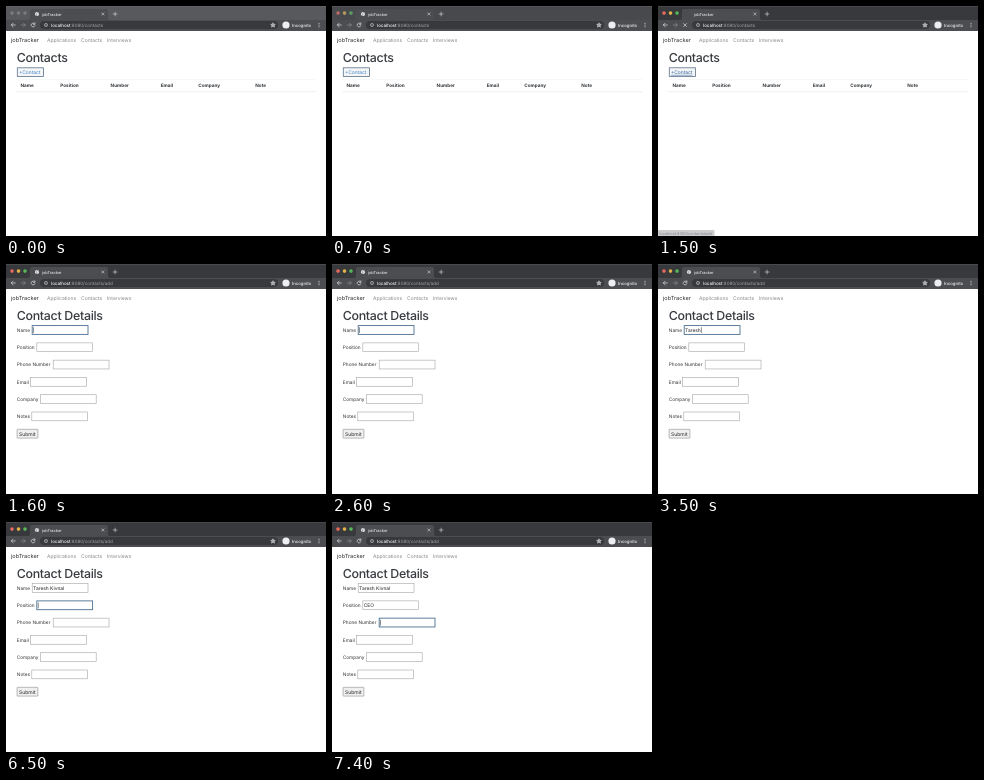
Recreate the animation shown at these times as an HTML page. Size 320 by 230 pixels, loop 8000 ms.

```html
<!DOCTYPE html>
<html lang="en">
<head>
<meta charset="utf-8">
<title>jobTracker</title>
<style>
  html, body { margin: 0; width: 100%; height: 100%; overflow: hidden; background: #fff; }
  svg { display: block; width: 100%; height: 100%; }
  text { font-family: Inter, "Noto Sans", sans-serif; white-space: pre; text-rendering: geometricPrecision; }
</style>
</head>
<body>
<svg id="stage" viewBox="0 0 320 230"></svg>
<script>
const LOOP = 8000;
const stage = document.getElementById('stage');

function add(parent, tag, attrs, content = '') {
  const el = document.createElementNS('http://www.w3.org/2000/svg', tag);
  for (const key in attrs) el.setAttribute(key, attrs[key]);
  el.textContent = content;
  parent.append(el);
  return el;
}
const group = parent => add(parent, 'g', {});
const rect = (parent, x, y, width, height, fill, more) =>
  add(parent, 'rect', { x, y, width, height, fill, ...more });
const circle = (parent, cx, cy, r, fill, more) =>
  add(parent, 'circle', { cx, cy, r, fill, ...more });
const line = (parent, d, stroke, width = .7) =>
  add(parent, 'path', { d, stroke, 'stroke-width': width, fill: 'none', 'stroke-linecap': 'round' });
const label = (parent, x, y, size, content, fill = '#303438', more) =>
  add(parent, 'text', { x, y, 'font-size': size, fill, ...more }, content);
const show = (el, on) => el.setAttribute('display', on ? 'inline' : 'none');

// Latest value in a list of [time, value] steps
function stepAt(steps, t, before) {
  let value = before;
  for (const [time, next] of steps) if (t >= time) value = next;
  return value;
}

// Browser window
const ICON = '#dadce0', TOOLBAR = '#4c4d51';
const strip = rect(stage, 0, 0, 320, 14, '#3a3b3f');
const lights = [6, 12.5, 19].map(x => circle(stage, x, 7.1, 1.8));
line(stage, 'M0 .2H320', '#77787b', .4);
add(stage, 'path', { d: 'M22 14Q24 14 24 12V5Q24 3 26 3H100Q102 3 102 5V12Q102 14 104 14Z', fill: TOOLBAR });
rect(stage, 0, 14, 320, 11, TOOLBAR);
const favicon = group(stage);
circle(favicon, 31, 8, 2.1, '#e8eaed');
line(favicon, 'M29.8 7.2L31 8.2L30.6 9.4M31.6 6.4L32.3 7.3', '#65676b', .6);
label(stage, 36, 9.5, 3.95, 'jobTracker', '#e4e5e7', { 'font-weight': 500 });
line(stage, 'M95.8 6.9l2.2 2.2m0-2.2l-2.2 2.2', ICON, .6);
line(stage, 'M107.2 8h3.8m-1.9-1.9v3.8', ICON, .6);

line(stage, 'M9.3 19H5.3m1.8-1.8L5.3 19l1.8 1.8', ICON);
line(stage, 'M15.3 19h4m-1.8-1.8L19.3 19l-1.8 1.8', '#8b8d91');
const reload = line(stage, 'M28.7 18A1.9 1.9 0 1 0 28.9 19.7M28.9 16.8v1.5h-1.5', ICON);
const stop = line(stage, 'M25.6 17.6l2.9 2.9m0-2.9l-2.9 2.9', ICON);
rect(stage, 34, 15, 238, 8, '#38393d', { rx: 4 });
circle(stage, 40, 19, 1.6, 'none', { stroke: '#c5c7ca', 'stroke-width': .6 });
line(stage, 'M40 18.9v.9M40 18.1v.05', '#c5c7ca', .5);
const address = label(stage, 45, 20.7, 4.5, '', '#a4a7ab');
add(address, 'tspan', { fill: '#f1f3f4', 'font-weight': 500 }, 'localhost');
const path = add(address, 'tspan', {});
add(stage, 'path', {
  d: 'M267 16.7l.7 1.5 1.7.2-1.3 1.1.4 1.7-1.5-.9-1.5.9.4-1.7-1.3-1.1 1.7-.2Z',
  fill: '#a9abae', stroke: ICON, 'stroke-width': .5
});
circle(stage, 280, 19, 3.6, '#eceef0');
label(stage, 286, 20.6, 4.3, 'Incognito', '#f1f3f4', { 'font-weight': 500 });
[17.2, 19, 20.8].forEach(y => circle(stage, 313, y, .55, ICON));

// Site navigation
label(stage, 5, 36.2, 5.6, 'jobTracker', '#2c2c2c');
[[41, 'Applications'], [75, 'Contacts'], [101, 'Interviews']]
  .forEach(([x, name]) => label(stage, x, 36.2, 5, name, '#888'));
const heading = (parent, content) =>
  label(parent, 10.7, 55.6, 12.4, content, '#383c40', { 'font-weight': 500, 'letter-spacing': -.3 });

// Contact list
const list = group(stage);
heading(list, 'Contacts');
rect(list, 11.3, 61.8, 26.2, 8.6, '#f4f5f6', { stroke: '#5d7289', 'stroke-width': .8 });
const addLink = label(list, 13, 67.9, 4.9, '+Contact');
line(list, 'M11 73.6H310', '#eff0f2', .5);
line(list, 'M11 85.7H310', '#e6e9ec', .7);
[[14.5, 'Name'], [54.3, 'Position'], [104.6, 'Number'], [154.7, 'Email'], [192.3, 'Company'], [249.3, 'Note']]
  .forEach(([x, name]) => label(list, x, 80.7, 4.65, name, '#33373b', { 'font-weight': 700 }));
const status = group(list);
rect(status, -1, 224, 57.5, 7, '#cbccce', { rx: 1 });
label(status, 1.5, 228.8, 3.85, 'localhost:8080/contacts/add', '#85878a');

// Contact form
const form = group(stage);
heading(form, 'Contact Details');
const fields = [['Name', 26.2], ['Position', 30.8], ['Phone Number', 47.2], ['Email', 24.6], ['Company', 34.4], ['Notes', 25.8]]
  .map(([name, x], i) => {
    const y = 61.6 + i * 17.28;
    label(form, 10.8, y + 6.2, 4.75, name);
    const box = rect(form, x, y, 55.8, 8.8, '#fff');
    return { x, y, box, text: label(form, x + .9, y + 6.2, 4.9, '', '#222') };
  });
rect(form, 11.1, 165.3, 20.8, 8.8, '#f0f0f0', { stroke: '#8c8c8c', 'stroke-width': .6, rx: .4 });
label(form, 13.1, 171.5, 5, 'Submit', '#222');
const caret = rect(form, 0, 0, .5, 5.8, '#222');

const typing = [
  ['Taresh Kivnal', [[2800, 1], [3000, 3], [3200, 4], [3300, 5], [3500, 6], [3700, 7],
    [4000, 8], [4200, 9], [4400, 10], [4600, 12], [4800, 13]]],
  ['CEO', [[6700, 1], [6800, 2], [7000, 3]]]
];
const focusSteps = [[5500, 1], [7400, 2]];
const caretSteps = [[2000, false], [2600, true], [5300, false], [5500, true], [6000, false], [6500, true]];

function render(t) {
  const active = t >= 800, fading = t >= 700;
  const onForm = t >= 1600;
  const hover = t >= 1400 && !onForm, loading = t >= 1500 && !onForm;

  strip.setAttribute('fill', active ? '#38393d' : fading ? '#48494d' : '#58595d');
  const colors = active ? ['#e8695f', '#e3b348', '#55b859']
    : fading ? ['#b56b68', '#b69b5a', '#5c9f65'] : ['#7a7b7e', '#7a7b7e', '#7a7b7e'];
  lights.forEach((light, i) => light.setAttribute('fill', colors[i]));

  show(favicon, !loading);
  show(reload, !loading);
  show(stop, loading);
  path.textContent = ':8080/contacts' + (onForm ? '/add' : '');

  show(list, !onForm);
  show(form, onForm);
  show(status, hover);
  addLink.setAttribute('fill', hover ? '#2c629e' : '#4087c8');
  addLink.setAttribute('text-decoration', hover ? 'underline' : 'none');
  if (!onForm) return;

  const focus = stepAt(focusSteps, t, 0);
  fields.forEach(({ box, text }, i) => {
    box.setAttribute('stroke', i === focus ? '#4b7092' : '#a5a5a5');
    box.setAttribute('stroke-width', i === focus ? .9 : .6);
    const [value, steps] = typing[i] || ['', []];
    text.textContent = value.slice(0, stepAt(steps, t, 0));
  });
  const { x, y, text } = fields[focus];
  caret.setAttribute('x', x + 1.1 + (text.textContent ? text.getComputedTextLength() : 0));
  caret.setAttribute('y', y + 1.6);
  show(caret, stepAt(caretSteps, t, true));
}

const start = performance.now();
function tick() {
  render((performance.now() - start) % LOOP);
  requestAnimationFrame(tick);
}
tick();
</script>
</body>
</html>
```
